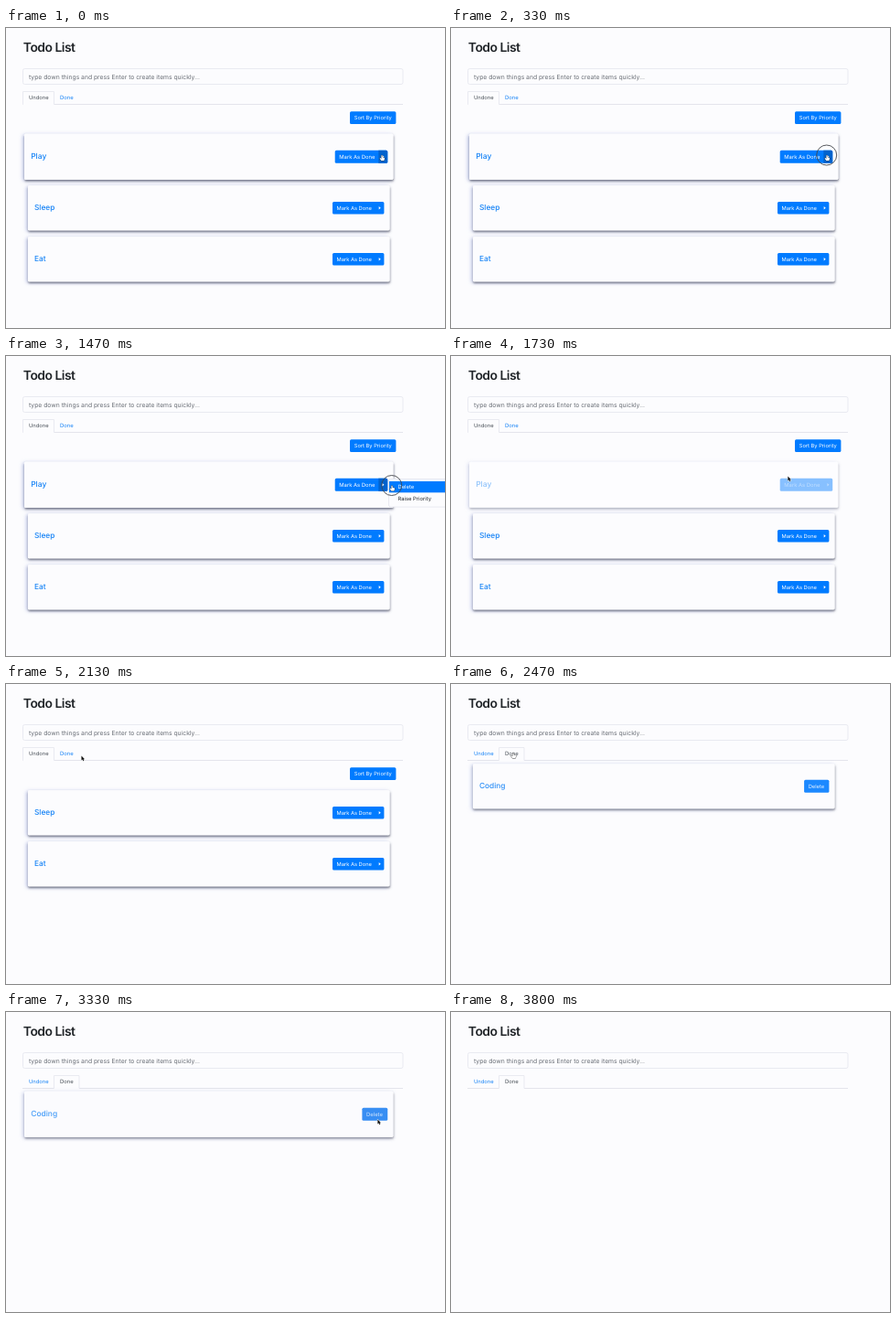
Recreate the animation shown at these times as an HTML page with a canvas. Size 480 by 328 pixels, loop 3940 ms.

```html
<!DOCTYPE html>
<html lang="en">
<head>
<meta charset="utf-8">
<title>Todo List</title>
<style>
  html, body { margin: 0; width: 100%; height: 100%; overflow: hidden; background: #fcfcfe; }
  canvas { display: block; }
</style>
</head>
<body>
<canvas id="stage" width="480" height="328"></canvas>
<script>
const ctx = document.getElementById('stage').getContext('2d');
const LOOP = 3940, STEP = 1000 / 15;
const PAGE = '#fcfcfe', BLUE = '#007bff', LINK = '#1683f6';
const LINE = '#e9eaf1', RULE = '#e4e5ec', INK = '#212529', ACTIVE = '#495057';
const CARD_X = 221.7, CARD_W = 395.5, CARD_H = 49;

// Pointer stops: time, x, y, optional downward bend of the path leading there
const PATH = [
  [0, 411, 139], [400, 411, 139], [660, 420, 141], [735, 420, 141], [860, 422, 141.5],
  [1600, 422, 141.5], [2130, 82.5, 78.5], [2265, 68, 75.3], [2530, 68, 75.3],
  [2930, 403.3, 114.7, 40], [3270, 403.3, 114.7], [3530, 424, 133], [3790, 486, 250]
];
const HAND_TIMES = [[0, 1610], [2190, 2590], [2900, 3320]];
const CLICKS = [330, 1465, 2260, 3130];

const ramp = (t, a, b) => {
  const k = Math.min(1, Math.max(0, (t - a) / (b - a)));
  return k * k * (3 - 2 * k);
};

function text(str, x, y, size, color, weight = 400, spacing = 0) {
  ctx.font = `${weight} ${size}px Inter, sans-serif`;
  ctx.letterSpacing = spacing + 'px';
  ctx.fillStyle = color;
  ctx.fillText(str, x, y);
}

function box(x, y, w, h, r, fill, stroke) {
  ctx.beginPath();
  ctx.roundRect(x, y, w, h, r);
  if (fill) { ctx.fillStyle = fill; ctx.fill(); }
  if (stroke) { ctx.strokeStyle = stroke; ctx.lineWidth = 1; ctx.stroke(); }
}

function line(x1, x2, y, color) {
  ctx.fillStyle = color;
  ctx.fillRect(x1, y, x2 - x1, 1);
}

// Shadows are clipped to the outside so that a fading card stays white
function cardBase() {
  const area = [-CARD_W / 2, -CARD_H / 2, CARD_W, CARD_H];
  ctx.save();
  ctx.beginPath();
  ctx.rect(-CARD_W, -CARD_H, 2 * CARD_W, 2 * CARD_H);
  ctx.roundRect(...area, 1.5);
  ctx.clip('evenodd');
  const shadow = (color, blur, dx, dy) => {
    ctx.shadowColor = color;
    ctx.shadowBlur = blur;
    ctx.shadowOffsetX = dx;
    ctx.shadowOffsetY = dy;
    box(...area, 1.5, PAGE);
  };
  shadow('rgba(165,178,225,.75)', 4, -1.5, 1);
  shadow('rgba(75,78,92,.75)', 2.5, 0.4, 1.8);
  ctx.restore();
  box(...area, 1.5, PAGE);
}

// Contents are placed relative to the card centre, so hovering scales all of it
function card(title, y, scale, alpha, drawButton) {
  if (alpha <= 0) return;
  ctx.save();
  ctx.globalAlpha = alpha;
  ctx.translate(CARD_X, y);
  ctx.scale(scale, scale);
  cardBase();
  text(title, -190.7, 2.2, 8.3, LINK, 500);
  drawButton();
  ctx.restore();
}

function markButton(active) {
  box(135.3, -6.7, 56.4, 13.6, 1.5, BLUE);
  if (active) box(182, -6.7, 9.7, 13.6, [0, 1.5, 1.5, 0], '#0062cc');
  text('Mark As Done', 139.8, 2.2, 5.75, '#fff');
  ctx.beginPath();
  ctx.moveTo(186, -1.6);
  ctx.lineTo(188, 0.1);
  ctx.lineTo(186, 1.8);
  ctx.fill();
}

function deleteButton(active) {
  box(164.4, -7, 27.3, 13.9, 1.5, active ? '#006ff0' : BLUE);
  text('Delete', 169, 2.2, 5.75, '#fff');
}

function header(doneTab) {
  text('Todo List', 18.8, 25.6, 13.9, INK, 600, -0.5);
  box(18.5, 44.5, 415.5, 17, 2, null, LINE);
  text('type down things and press Enter to create items quickly...', 25, 56, 6.77, '#686d74');

  const [left, right] = doneTab ? [52.5, 80] : [18.5, 52.5];
  line(18, left, 83, RULE);
  line(right, 434, 83, RULE);
  ctx.beginPath();
  ctx.moveTo(left, 83.5);
  ctx.lineTo(left, 69.5);
  ctx.lineTo(right, 69.5);
  ctx.lineTo(right, 83.5);
  ctx.strokeStyle = LINE;
  ctx.lineWidth = 1;
  ctx.stroke();
  text('Undone', 25, 78, 5.8, doneTab ? LINK : ACTIVE);
  text('Done', 59, 78, 5.9, doneTab ? ACTIVE : LINK);
}

function menu(t) {
  if (t < 460 || t >= 1595) return;
  box(418.5, 134.5, 66, 30.5, 2, PAGE, LINE);
  const hot = t >= 800;
  if (hot) {
    ctx.fillStyle = BLUE;
    ctx.fillRect(419, 137, 61, 12.3);
  }
  text('Delete', 428.5, 145.2, 5.85, hot ? '#fff' : INK);
  text('Raise Priority', 428.5, 157.7, 5.85, INK);
}

function undoneList(t) {
  box(376, 91.3, 50.4, 13.7, 1.5, BLUE);
  text('Sort By Priority', 380.7, 100.3, 5.75, '#fff');
  const rise = 56 * ramp(t, 1850, 2117);
  card('Play', 140.7, 1.02, 1 - ramp(t, 1595, 1860), () => markButton(t < 1595));
  card('Sleep', 196.7 - rise, 1, 1, () => markButton(false));
  card('Eat', 252.7 - rise, 1, 1, () => markButton(false));
  menu(t);
}

function doneList(t) {
  const alpha = ramp(t, 2320, 2505) * (1 - ramp(t, 3260, 3500));
  const scale = 1 + 0.02 * ramp(t, 2600, 2800);
  card('Coding', 111.8, scale, alpha, () => deleteButton(t >= 2900));
}

function pointerAt(t) {
  const i = PATH.findIndex(p => p[0] > t);
  if (i < 0) return null;
  const [t0, x0, y0] = PATH[i - 1], [t1, x1, y1, bend = 0] = PATH[i];
  const k = ramp(t, t0, t1);
  return [x0 + (x1 - x0) * k, y0 + (y1 - y0) * k + bend * 4 * k * (1 - k)];
}

function pointer(t) {
  const at = pointerAt(t);
  if (!at) return;
  ctx.save();
  ctx.translate(...at);
  const hand = HAND_TIMES.some(([a, b]) => t >= a && t < b);
  if (hand) ctx.scale(0.85, 0.85);
  const shape = new Path2D(hand
    ? 'M-.7 .5Q0-.5 .7 .5V2.6L3 3.2Q3.8 3.5 3.5 4.7L2.8 7H-.8L-2.8 4.3Q-2.6 3.3-1.7 3.8L-.7 4.6Z'
    : 'M0 0V5L1.2 4L2 5.8L2.9 5.4L2.1 3.7H3.6Z');
  ctx.lineWidth = 0.9;
  ctx.strokeStyle = hand ? '#222' : '#fff';
  ctx.fillStyle = hand ? '#fff' : '#111';
  ctx.stroke(shape);
  ctx.fill(shape);
  ctx.restore();
}

function clickRing(t) {
  const start = CLICKS.find(c => t >= c && t < c + 200);
  if (start === undefined) return;
  const [x, y] = pointerAt(t);
  ctx.save();
  ctx.globalAlpha = 1 - ramp(t, start + 60, start + 200);
  ctx.beginPath();
  ctx.arc(x - 0.3, y, 11, 0, Math.PI * 2);
  ctx.strokeStyle = '#45474c';
  ctx.lineWidth = 0.9;
  ctx.stroke();
  ctx.restore();
}

function draw(now) {
  const t = Math.floor((now % LOOP + 4) / STEP) * STEP;
  const doneTab = t >= 2320;
  ctx.textRendering = 'geometricPrecision';
  ctx.fillStyle = PAGE;
  ctx.fillRect(0, 0, 480, 328);
  header(doneTab);
  (doneTab ? doneList : undoneList)(t);
  clickRing(t);
  pointer(t);
}

const begin = performance.now();
function tick() {
  draw(performance.now() - begin);
  requestAnimationFrame(tick);
}
tick();
</script>
</body>
</html>
```
